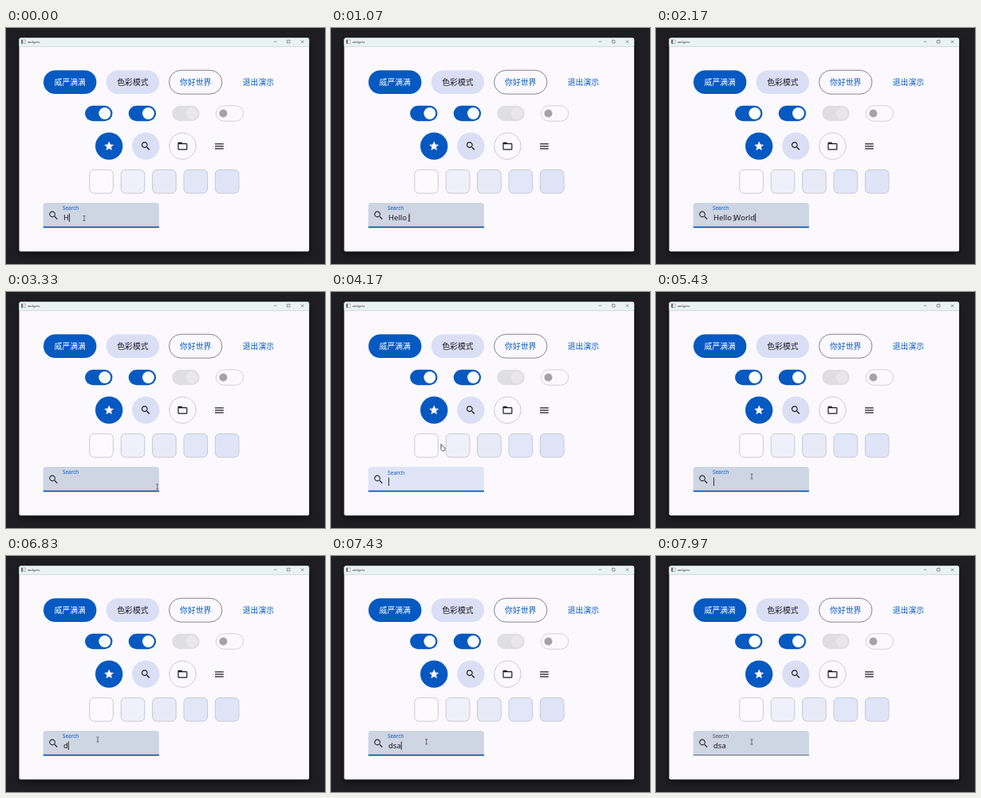
An HTML page that plays this animation: 400 by 297 pixels, repeating every 8000 ms.

```html
<!DOCTYPE html>
<html lang="zh">
<head>
<meta charset="utf-8">
<title>widgets</title>
<style>
  html, body { margin: 0; width: 100%; height: 100%; overflow: hidden; background: #1f1e23; }
  svg { display: block; width: 400px; height: 297px; }
  text { font-family: "Noto Sans", "Open Sans", sans-serif; fill: #1b1b20; white-space: pre; }
  .cjk { font: 9.8px "Noto Sans CJK SC", "Noto Sans CJK", sans-serif; text-anchor: middle; }
  .line { fill: none; stroke: #55565c; }
  .window { fill: #fbf9fe; filter: drop-shadow(0 3px 5px #0008); }
</style>
</head>
<body>
<svg viewBox="0 0 400 297">
  <rect width="400" height="297" fill="#1f1e23"/>
  <rect class="window" x="16.5" y="12.5" width="363.6" height="268.8" rx="2"/>
  <path d="M16.5 23V14.5Q16.5 12.5 18.5 12.5H378.1Q380.1 12.5 380.1 14.5V23Z" fill="#eaf3f4"/>
  <path d="M16.5 23.3H380.1" stroke="#c3cdcf" stroke-width=".7"/>
  <rect x="19.7" y="15" width="4.4" height="4.4" fill="#f7f7f7" stroke="#888" stroke-width=".6"/>
  <path d="M19.4 15H21V19.4H19.4Z" fill="#555"/>
  <text x="27" y="18.8" font-size="4.2" style="fill:#333">widgets</text>
  <path class="line" stroke-width=".6" d="M335.8 17.2H339.4M352.4 15.4H356V19H352.4ZM369.8 15.4 373.4 19M373.4 15.4 369.8 19"/>

  <g id="buttons"></g>
  <g id="switches"></g>
  <circle cx="129.2" cy="148.6" r="17.2" fill="#0559c1"/>
  <circle cx="175.3" cy="148.6" r="17.2" fill="#dbdff6"/>
  <circle cx="221.4" cy="148.6" r="16.7" fill="none" stroke="#c2c3cd" stroke-width=".9"/>
  <g id="tiles"></g>

  <path id="field" d="M46.7 251V224Q46.7 220.1 50.6 220.1H188Q191.9 220.1 191.9 224V251Z"/>
  <path id="underline" d="M46.7 250.6H191.9"/>
  <g id="icons"></g>
  <text id="label" x="71">Search</text>
  <text id="value" x="72" y="242.2" font-size="9.5"></text>
  <path id="caret" stroke="#1b1b20" stroke-width=".9" d="M0 233.5V244"/>
  <g id="pointer">
    <path id="beam" class="line" stroke-width=".8" d="M-1.5 -3H1.5M0 -3V3M-1.5 3H1.5"/>
    <path id="arrow" d="M-2 -4.5V2.2Q-.8 4.6 1.6 4Q3.6 3 3 .6Z" fill="#fff" stroke="#222" stroke-width=".8"/>
  </g>
</svg>
<script>
const $ = id => document.getElementById(id);
const BLUE = '#0559c1', INK = '#1b1b20', LOOP = 8000, BLINK = 530, FLOAT = 250;

const rect = (x, y, w, h, r, fill, stroke = 'none', width = .9) =>
  `<rect x="${x}" y="${y}" width="${w}" height="${h}" rx="${r}" fill="${fill}" stroke="${stroke}" stroke-width="${width}"/>`;

$('buttons').innerHTML = [
  ['威严满满', 80.2, BLUE, 'none', '#fff'],
  ['色彩模式', 158.9, '#dbdff6', 'none', INK],
  ['你好世界', 237.7, 'none', '#74767e', BLUE],
  ['退出演示', 316.4, 'none', 'none', BLUE],
].map(([text, x, fill, stroke, color]) =>
  rect(x - 33.2, 53.2, 66.4, 29.9, 14.95, fill, stroke) +
  `<text class="cjk" x="${x}" y="72" style="fill:${color}">${text}</text>`).join('');

$('switches').innerHTML = [
  [99.1, BLUE, 'none', 24.7, 7.4, '#fff'],
  [153.7, BLUE, 'none', 24.7, 7.4, '#fff'],
  [208.3, '#dfdee2', 'none', 24.7, 7.4, '#e9e7ec'],
  [263.4, '#fbf9fe', '#ceccd3', 9, 5, '#a3a2a6'],
].map(([x, fill, stroke, knob, r, color]) =>
  rect(x, 97.8, 34.4, 19.4, 9.7, fill, stroke) +
  `<circle cx="${x + knob}" cy="107.5" r="${r}" fill="${color}"/>`).join('');

$('tiles').innerHTML = ['#fcfaff', '#f0f0fa', '#e9eaf8', '#e2e7f7', '#dfe4f7']
  .map((fill, i) => rect(104.8 + i * 39.4, 178.4, 29.6, 29.6, 5.5, fill, '#c2c4d0')).join('');

// Icons are drawn on a 24-unit grid.
const lens = 'M15.5 14h-.8l-.3-.3A6.5 6.5 0 1 0 13.7 14.4l.3.3v.8l5 5L20.5 19zM9.5 14a4.5 4.5 0 1 1 0-9 4.5 4.5 0 0 1 0 9z';
$('icons').innerHTML = [
  [129.2, 148.6, '#fff', 'M12 17.3 18.2 21 16.5 14 22 9.2 14.8 8.6 12 2 9.2 8.6 2 9.2 7.5 14 5.8 21z'],
  [175.3, 148.6, INK, lens],
  [221.4, 148.6, INK, 'M20 6h-8l-2-2H4Q2 4 2 6V18Q2 20 4 20H20Q22 20 22 18V8Q22 6 20 6zM20 18H4V8H20z'],
  [267.4, 148.8, INK, 'M3 18H21V16H3zM3 13H21V11H3zM3 8H21V6H3z'],
  [59.6, 235.9, '#2b2d35', lens],
].map(([x, y, fill, d]) =>
  `<path transform="translate(${x} ${y}) scale(.6) translate(-12 -12)" fill="${fill}" fill-rule="evenodd" d="${d}"/>`).join('');

// Each edit is [time, text]; an edit or a regained focus restarts the caret blink.
const hello = 'Hello World';
const edits = [0, 200, 370, 530, 700, 870, 1130, 1270, 1400, 1530, 1800]
  .map((t, i) => [t, hello.slice(0, i + 1)]);
for (let i = 1; i <= hello.length; i++) edits.push([2460 + i * 30, hello.slice(0, -i)]);
edits.push([6770, 'd'], [6930, 'ds'], [7070, 'dsa']);

const CLICK_OUT = 3600, CLICK_IN = 4000, BLUR = 7830;

const path = [
  [0, 98, 239.5], [2830, 98, 239.5], [3300, 189.5, 244.3], [3600, 198, 266], [3980, 146, 226],
  [4170, 140, 196], [4400, 134, 206], [4800, 120, 232], [5700, 120, 232],
  [6030, 115, 231], [7100, 115, 231], [7500, 120, 234], [LOOP, 120, 234],
];

function pointerAt(t) {
  const i = path.findIndex(p => p[0] > t);
  const [t0, x0, y0] = path[i - 1], [t1, x1, y1] = path[i];
  const u = (t - t0) / (t1 - t0), k = u * u * (3 - 2 * u);
  return [x0 + (x1 - x0) * k, y0 + (y1 - y0) * k];
}

const easeOut = u => 1 - (1 - Math.min(1, Math.max(0, u))) ** 2;

function draw(t) {
  const [editedAt, text] = edits.findLast(e => e[0] <= t);
  const focused = t < CLICK_OUT || t >= CLICK_IN && t < BLUR;
  const [x, y] = pointerAt(t);
  const hovered = x > 47 && x < 192 && y > 220 && y < 251;

  $('value').textContent = text;
  const width = text ? $('value').getComputedTextLength() : 0;
  const blinkFrom = t >= CLICK_IN ? Math.max(CLICK_IN, editedAt) : editedAt;
  $('caret').setAttribute('transform', `translate(${72.5 + width})`);
  $('caret').style.display = focused && (t - blinkFrom) % (2 * BLINK) < BLINK ? '' : 'none';

  // The label rests in the empty field and floats up on focus.
  const drop = easeOut((t - CLICK_OUT) / FLOAT) - easeOut((t - CLICK_IN) / FLOAT);
  $('label').setAttribute('y', 228.9 + 11 * drop);
  $('label').setAttribute('font-size', 6.4 + 3.1 * drop);
  $('label').style.fill = focused ? BLUE : '#44464e';

  $('field').setAttribute('fill', hovered ? '#ced5e3' : '#dfe4f6');
  $('underline').setAttribute('stroke', focused ? BLUE : '#55575f');
  $('underline').setAttribute('stroke-width', focused ? 1.7 : .9);

  $('pointer').setAttribute('transform', `translate(${x} ${y})`);
  $('beam').style.display = hovered ? '' : 'none';
  $('arrow').style.display = hovered ? 'none' : '';
}

const start = performance.now();
function tick() {
  draw((performance.now() - start) % LOOP);
  requestAnimationFrame(tick);
}
tick();
</script>
</body>
</html>
```
